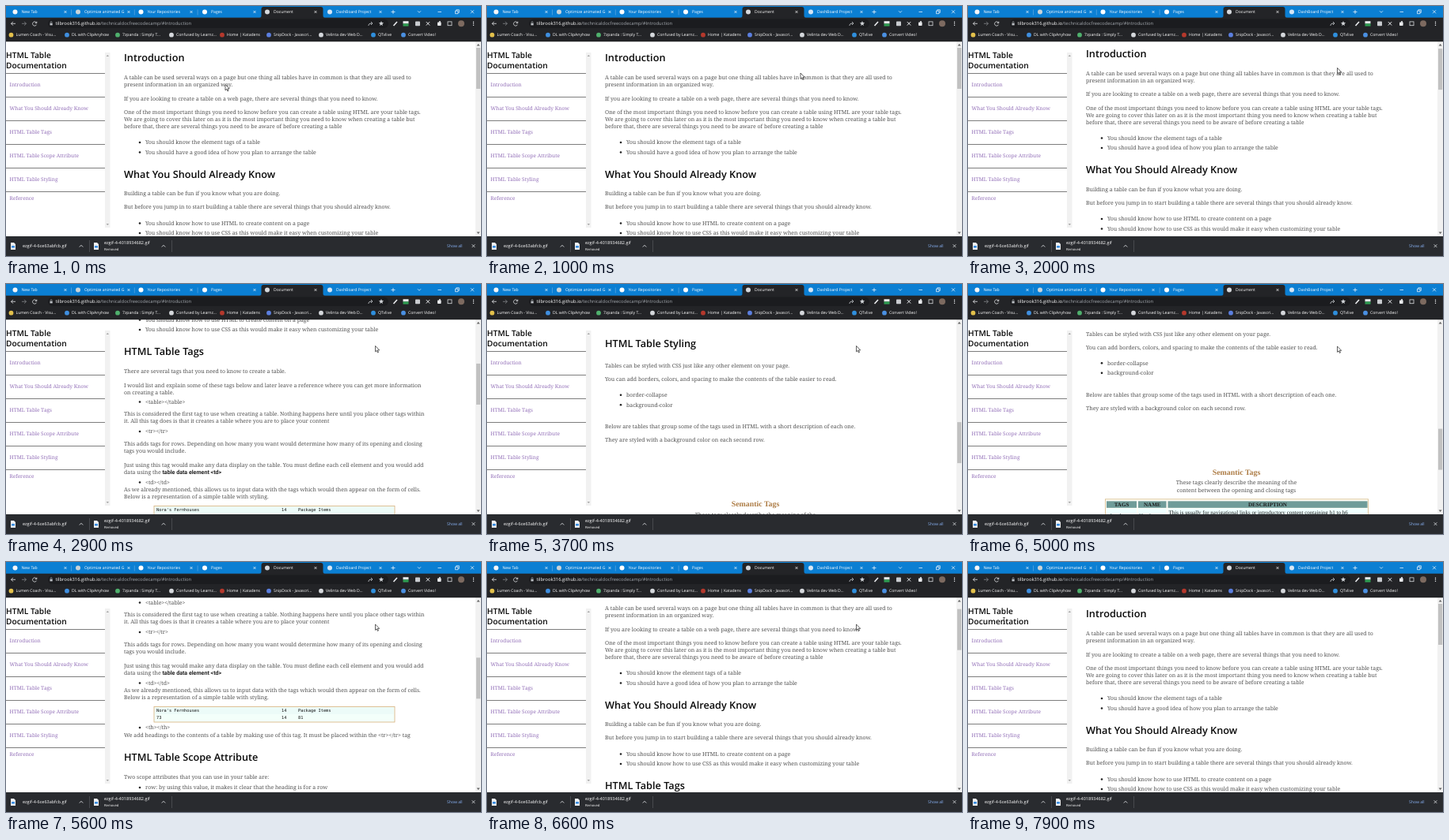
These frames come from a looping animation (600x317 px, 8 s). An HTML page:

```html
<!DOCTYPE html>
<html lang="en">
<head>
<meta charset="utf-8">
<title>Technical documentation page</title>
<style>
  html, body { margin: 0; width: 100%; height: 100%; overflow: hidden; background: #fff; }
  svg { display: block; width: 600px; height: 317px; }
  text { text-rendering: geometricPrecision; white-space: pre; }
  .ui { font: 500 5.1px "Open Sans", sans-serif; fill: #fff; }
  .url { font-size: 5.85px; }
  .dim { fill: #a3a8ae; }
  .file { font-size: 5.5px; }
  .tiny { font-size: 4.2px; }
  .link { fill: #8ab4f8; }
  .body { font: 300 6.95px "Noto Serif", serif; fill: #525252; }
  .nav { font: 300 6.5px "Noto Serif", serif; fill: #9370b8; }
  .h { font: 600 12.7px "Open Sans", sans-serif; fill: #0a0a0a; }
  .side { font: 600 10.2px "Open Sans", sans-serif; fill: #0a0a0a; }
  .strong { font: 700 7.1px Roboto, sans-serif; fill: #222; }
  .cell { font: 7.05px "Liberation Serif", serif; fill: #1c1c1c; }
  .th { font-weight: 700; }
  .title { font: 700 9.9px "Liberation Serif", serif; fill: #ad7c45; }
  .mono { font: 5.3px "DejaVu Sans Mono", monospace; fill: #111; }
  .mid { text-anchor: middle; }
</style>
</head>
<body>
<script>
const LOOP = 8000, STEP = 100;

function add(parent, tag, attrs = {}, content) {
  const node = document.createElementNS('http://www.w3.org/2000/svg', tag);
  for (const key in attrs) node.setAttribute(key, attrs[key]);
  if (content) node.textContent = content;
  parent.append(node);
  return node;
}
const rect = (p, x, y, width, height, fill, more) => add(p, 'rect', { x, y, width, height, fill, ...more });
const dot = (p, cx, cy, r, fill) => add(p, 'circle', { cx, cy, r, fill });
const line = (p, d, stroke, width = 0.8) => add(p, 'path', { d, stroke, fill: 'none', 'stroke-width': width });
const solid = (p, d, fill) => add(p, 'path', { d, fill });
// y is the middle of the capitals
const text = (p, cls, x, y, str) => add(p, 'text', { class: cls, x, y, dy: '.35em' }, str);
const cross = (p, x, y, r, color, w) => line(p, `M${x - r} ${y - r}l${2 * r} ${2 * r}m0 ${-2 * r}l${-2 * r} ${2 * r}`, color, w);

const svg = add(document.body, 'svg', { viewBox: '0 0 600 317' });
rect(svg, 0, 0, 600, 317, '#fff');
const page = add(svg, 'g');

// ---- scrolling document ----
const prose = [
  [91, 'A table can be used several ways on a page but one thing all tables have in common is that they are all used to'],
  [100, 'present information in an organized way.'],
  [117.5, 'If you are looking to create a table on a web page, there are several things that you need to know.'],
  [135, 'One of the most important things you need to know before you can create a table using HTML are your table tags.'],
  [144, 'We are going to cover this later on as it is the most important thing you need to know when creating a table but'],
  [153, 'before that, there are several things you need to be aware of before creating a table'],
  [238, 'Building a table can be fun if you know what you are doing.'],
  [255, 'But before you jump in to start building a table there are several things that you should already know.'],
  [341, 'There are several tags that you need to know to create a table.'],
  [358.5, 'I would list and explain some of these tags below and later leave a reference where you can get more information'],
  [367.5, 'on creating a table.'],
  [395, 'This is considered the first tag to use when creating a table. Nothing happens here until you place other tags within'],
  [404, 'it. All this tag does is that it creates a table where you are to place your content'],
  [432.5, 'This adds tags for rows. Depending on how many you want would determine how many of its opening and closing'],
  [441.5, 'tags you would include.'],
  [460, 'Just using this tag would make any data display on the table. You must define each cell element and you would add'],
  [491, 'As we already mentioned, this allows us to input data with the tags which would then appear on the form of cells.'],
  [500, 'Below is a representation of a simple table with styling.'],
  [548, 'We add headings to the contents of a table by making use of this tag. It must be placed within the <tr></tr> tag'],
  [601, 'Two scope attributes that you can use in your table are:'],
  [690, 'Tables can be styled with CSS just like any other element on your page.'],
  [707, 'You can add borders, colors, and spacing to make the contents of the table easier to read.'],
  [767, 'Below are tables that group some of the tags used in HTML with a short description of each one.'],
  [784, 'They are styled with a background color on each second row.'],
];
const bullets = [
  [173, 'You should know the element tags of a table'],
  [185.5, 'You should have a good idea of how you plan to arrange the table'],
  [275.5, 'You should know how to use HTML to create content on a page'],
  [288, 'You should know how to use CSS as this would make it easy when customizing your table'],
  [379.5, '<table></table>'], [417, '<tr></tr>'], [481.5, '<td></td>'], [538, '<th></th>'],
  [614, 'row: by using this value, it makes it clear that the heading is for a row'],
  [626.5, 'col: by using this value, it makes it clear that the heading is for a column'],
  [727, 'border-collapse'], [739.5, 'background-color'],
];
const heads = [[66, 'Introduction'], [213.5, 'What You Should Already Know'], [316, 'HTML Table Tags'],
  [576, 'HTML Table Scope Attribute'], [662, 'HTML Table Styling']];

for (const [y, str] of prose) text(page, 'body', 149, y, str);
for (const [y, str] of bullets) { dot(page, 169, y, 1.3, '#222'); text(page, 'body', 176, y, str); }
for (const [y, str] of heads) text(page, 'h', 149, y, str);
const mixed = text(page, 'body', 149, 469, 'data using the ');
add(mixed, 'tspan', { class: 'strong' }, 'table data element <td>');

rect(page, 187, 511.5, 304, 19.5, '#f3fffa', { stroke: '#d6b07c', 'stroke-width': 0.8 });
rect(page, 188.5, 512.5, 301, 8.5, '#ecfbf8');
[[190, "Nora's Fernhouses", '73'], [348, '14', '14'], [369, 'Package Items', '81']].forEach(([x, a, b]) => {
  text(page, 'mono', x, 516.3, a);
  text(page, 'mono', x, 525.6, b);
});

function tagTable(top, bottom, cols, rows) {
  rect(page, 173.5, top, 332, bottom - top, '#fffdf6', { stroke: '#d9c193', 'stroke-width': 0.9 });
  const spans = cols.map((x, i) => [x, (cols[i + 1] || 506.5) - x - 2]);
  spans.forEach(([x, w], i) => {
    rect(page, x, top + 2.5, w, 8.5, '#6f9c99');
    text(page, 'cell th mid', x + w / 2, top + 7, ['TAGS', 'NAME', 'DESCRIPTION'][i]);
  });
  rows.forEach(([y, h, tag, name, ...about], i) => {
    y += top;
    for (const [x, w] of spans) rect(page, x, y, w, h, i % 2 ? '#dcffd4' : '#efffff');
    [[tag], name.split('|'), about].forEach((parts, c) => parts.forEach((str, k) =>
      text(page, 'cell', cols[c] + 1, y + h / 2 + (k - (parts.length - 1) / 2) * 8.5, str)));
  });
}
text(page, 'title mid', 339, 865, 'Semantic Tags');
text(page, 'body mid', 339, 878.5, 'These tags clearly describe the meaning of the');
text(page, 'body mid', 339, 888, 'content between the opening and closing tags');
tagTable(899.5, 1075.5, [175, 215, 252.5], [
  [12, 18, '<header>', 'Header tag', 'This is usually for navigational links or introductory content containing h1 to h6', 'headings'],
  [30.5, 17.5, '<main>', 'Main tag', 'It is used to encapsulate the dominant content within a webpage. This element wraps the', 'main content of the page, and there should be only one per page.'],
  [48.5, 17, '<article>', 'Article tag', 'It used to to wrap independent, self-contained content. This tag works well with blog', 'entries, forum posts, or news articles.'],
  [66.5, 9, '<section>', 'Section tag', 'Groups related content. It is used for grouping thematically related content.'],
  [76, 17, '<nav>', 'Navigation|tag', 'This is used to define a block of navigation links such as menus and tables of contents.', 'It can be used inside the header element and also on its own.'],
  [94, 26, '<footer>', 'Footer tag', 'Mostly located at the bottom of the page outside the <main> tag and is used to hold info', 'such as contact information, copyright information, Terms of use, Site Map, Reference', 'to top page links, etc.'],
  [120.5, 17.5, '<aside>', 'Aside tag', 'This is used to mark additional information that can enhance another element but isn\'t', 'required in order to understand the main content.'],
  [138.5, 17, '<Figure>', 'Figure tag', 'It is an illustration used to encapsulate media such as image, illustration, diagram, code', 'snippet, etc.'],
  [156.5, 17, '<Figcaption>', 'Figcaption|tag', 'This is used to add a caption to the image as it is an element used to describe the media', 'in the <figure tag>.'],
]);
text(page, 'title mid', 339, 1089, 'Non-Semantic Tags');
text(page, 'body mid', 339, 1100.5, 'These tags tell us nothing about their contents.');
tagTable(1112, 1145, [175, 199, 234.5], [
  [12.5, 18.5, '<div>', 'Division|tag', 'This defines a division or a section in an HTML document. It is used as a container for HTML', 'elements, which are then styled with CSS.'],
]);

// ---- side menu ----
['HTML Table', 'Documentation'].forEach((str, i) => text(svg, 'side', 0, 62.5 + i * 13, str));
['Introduction', 'What You Should Already Know', 'HTML Table Tags', 'HTML Table Scope Attribute', 'HTML Table Styling', 'Reference']
  .forEach((str, i) => {
    line(svg, `M0 ${85.5 + i * 30}H125`, '#5c5c5c');
    text(svg, 'nav', 4.5, i < 5 ? 99.5 + i * 30 : 244, str);
  });
rect(svg, 125, 59, 6.5, 222, '#f1f1f1');
solid(svg, 'M126.6 64l1.7-2 1.7 2zM126.6 276l1.7 2 1.7-2z', '#a3a3a3');

// ---- page scrollbar ----
rect(svg, 593, 45, 7, 248, '#f1f1f1');
solid(svg, 'M594.6 50.5l2-2.4 2 2.4zM594.6 286.5l2 2.4 2-2.4z', '#606060');
const thumb = rect(svg, 594, 0, 5.2, 52, '#c1c1c1');

// ---- tabs ----
const BAR = '#232427';
rect(svg, 0, 0, 600, 15, '#0b7fd3');
solid(svg, 'M320 15q2.5 0 2.5-3V4q0-3 3-3h72q3 0 3 3v8q0 3 2.5 3z', BAR);
[['New Tab', 19.5, 75, '#f4f6f8'], ['Optimize animated G', 99, 155, '#c9d3d8'], ['Your Repositories', 178.5, 234, '#fff'],
 ['Pages', 259, 314, '#fff'], ['Document', 338, 391, '#d5d8dc'], ['DashBoard Project', 417, 473, '#d5e6f5']]
  .forEach(([str, x, end, color], i) => {
    dot(svg, x - 8, 7.5, 3, color);
    text(svg, 'ui', x, 7.4, str);
    cross(svg, end, 7.5, 1.5, '#fff', 0.7);
    if (i < 3) line(svg, `M${82.5 + i * 79.8} 4.5v7`, '#6fb1e4', 0.6);
  });
line(svg, 'M489 5v5M486.5 7.5h5M520 6.3l2 2 2-2M545.5 7.5h4.5M567.5 6.2h3.5v3.5h-3.5zM568.8 6v-1.2h3.5v3.6h-1', '#fff', 0.7);
cross(svg, 589, 7.3, 2, '#fff', 0.7);

// ---- address row and bookmarks ----
rect(svg, 0, 14.7, 600, 30.5, BAR);
rect(svg, 53, 16.6, 430, 11.4, '#1b1c1f', { rx: 5.7 });
line(svg, 'M12 22.3H6.5l2.4-2.4M6.5 22.3l2.4 2.4M38.5 21.3a2.6 2.6 0 1 0 0 2.4M38.8 19.7v2h-2', '#e8eaed');
line(svg, 'M20 22.3h5.5l-2.4-2.4M25.5 22.3l-2.4 2.4', '#85888c');
rect(svg, 55.5, 21.8, 3.2, 2.6, '#bdc1c6');
line(svg, 'M56.2 21.6v-1a.9.9 0 0 1 1.8 0v1', '#bdc1c6', 0.6);
const url = text(svg, 'ui url', 62.5, 22.4, 'tilbrook316.github.io');
add(url, 'tspan', { class: 'dim' }, '/technicaldocfreecodecamp/#Introduction');

line(svg, 'M461 20l2 2-2 2M458 25v-1q0-2 4-2', '#cfd2d6', 0.8);
solid(svg, 'M474 19l.9 2.1 2.2.2-1.7 1.5.5 2.2-1.9-1.2-1.9 1.2.5-2.2-1.7-1.5 2.2-.2z', '#cfd2d6');
line(svg, 'M489.5 25l4.5-5', '#e8eaed', 1.6);
rect(svg, 501.5, 19.2, 7, 3.2, '#e8eaed');
rect(svg, 501.5, 22.4, 7, 3.2, '#2f9e52');
rect(svg, 517, 19.5, 6, 5.8, '#c9ccd0', { rx: 0.8 });
cross(svg, 533, 22.3, 2.2, '#e8eaed', 1);
rect(svg, 545, 20.4, 4.6, 4.6, '#e8eaed', { rx: 0.8 });
dot(svg, 548, 20, 1.1, '#e8eaed');
rect(svg, 558, 19.9, 5, 4.8, 'none', { stroke: '#d6d9dc', 'stroke-width': 0.8 });
dot(svg, 575, 22.3, 4, '#7d6a60');
for (const y of [20.2, 22.3, 24.4]) dot(svg, 590.5, y, 0.7, '#e8eaed');

[['Lumen Coach - Visu...', 12.5, '#e2c04b'], ['DL with ClipAnyhow', 83, '#3f8fe0'], ['7zpanda : Simply T...', 147, '#4fb06d'],
 ['Confused by Learnz...', 215, '#d5d8dc'], ['Home | Katadens', 279, '#b5382c'], ['SnipDock - Javascri...', 338, '#5b7fe0'],
 ['Velinta dev Web D...', 404, '#d5d8dc'], ['QTvlive', 470, '#2f8fdd'], ['Convert Video!', 508, '#4a90e2']]
  .forEach(([str, x, color]) => {
    dot(svg, x - 6, 36.7, 2.9, color);
    text(svg, 'ui', x, 36.7, str);
  });

// ---- download bar ----
rect(svg, 0, 292, 600, 25, '#292b2f');
line(svg, 'M105.5 297v15M209.5 297v15', '#55575c', 0.7);
for (const [x, chev] of [[9, 95], [114, 199]]) {
  solid(svg, `M${x - 3} 300h4l2 2v7h-6z`, '#eef1f4');
  rect(svg, x - 2, 304, 4, 2.6, '#3b8de0');
  line(svg, `M${chev - 2.2} 305.5l2.2-2.2 2.2 2.2`, '#dfe1e5', 0.9);
}
text(svg, 'ui file', 21, 304.2, 'ezgif-4-6ce63abfcb.gif');
text(svg, 'ui file', 124, 300.3, 'ezgif-4-4018934682.gif');
text(svg, 'ui tiny', 124, 309, 'Removed');
text(svg, 'ui link', 557, 304.2, 'Show all');
cross(svg, 590.5, 304.2, 1.9, '#dfe1e5', 0.8);

// ---- pointer ----
const pointer = add(svg, 'g');
const arrow = add(pointer, 'path', { d: 'M0 0v7.4l1.7-1.6 1.2 2.7 1.1-.5-1.1-2.6h2.3z', fill: '#fff', stroke: '#222', 'stroke-width': 0.7 });
const beam = line(pointer, 'M-1.3-4h2.6M0-4v8M-1.3 4h2.6', '#222', 0.7);

// ---- motion: [time, values...] ----
const scrollPath = [[1900, 0], [2000, 5.5], [2500, 176], [2600, 176], [2900, 230], [3500, 500], [4300, 845], [4400, 855],
  [4500, 840], [4800, 690], [4900, 690], [5200, 500], [5300, 500], [5600, 328], [6200, 120], [6300, 120], [6600, 32], [7000, 0]];
// last value: 1 turns the arrow into a text beam
const pointerPath = [[400, 277, 99.5, 0], [700, 345, 90, 0], [800, 345, 90, 0], [1000, 396, 85, 0], [1100, 396, 85, 0],
  [1200, 420, 82, 0], [1300, 420, 82, 0], [1500, 466.5, 78.5, 0], [4400, 466.5, 78.5, 0], [4500, 470, 82, 1],
  [4600, 466.5, 79, 0], [7100, 466.5, 79, 0], [7300, 400, 84, 0], [7700, 120, 80, 0], [7900, 45.5, 74.5, 1]];

function at(path, t) {
  const i = path.findIndex(k => k[0] > t);
  if (i < 0) return path[path.length - 1].slice(1);
  if (i === 0) return path[0].slice(1);
  const a = path[i - 1], b = path[i], f = (t - a[0]) / (b[0] - a[0]);
  return a.slice(1).map((v, k) => v + (b[k + 1] - v) * f);
}

function draw(now) {
  const t = Math.floor(now % LOOP / STEP) * STEP;
  const [scroll] = at(scrollPath, t), [x, y, onText] = at(pointerPath, t);
  page.setAttribute('transform', `translate(0 ${-scroll})`);
  thumb.setAttribute('y', 53 + scroll / 4.8);
  pointer.setAttribute('transform', `translate(${x} ${y})`);
  arrow.style.display = onText === 1 ? 'none' : '';
  beam.style.display = onText === 1 ? '' : 'none';
}

const start = performance.now();
function tick() {
  draw(performance.now() - start);
  requestAnimationFrame(tick);
}
tick();
</script>
</body>
</html>
```
